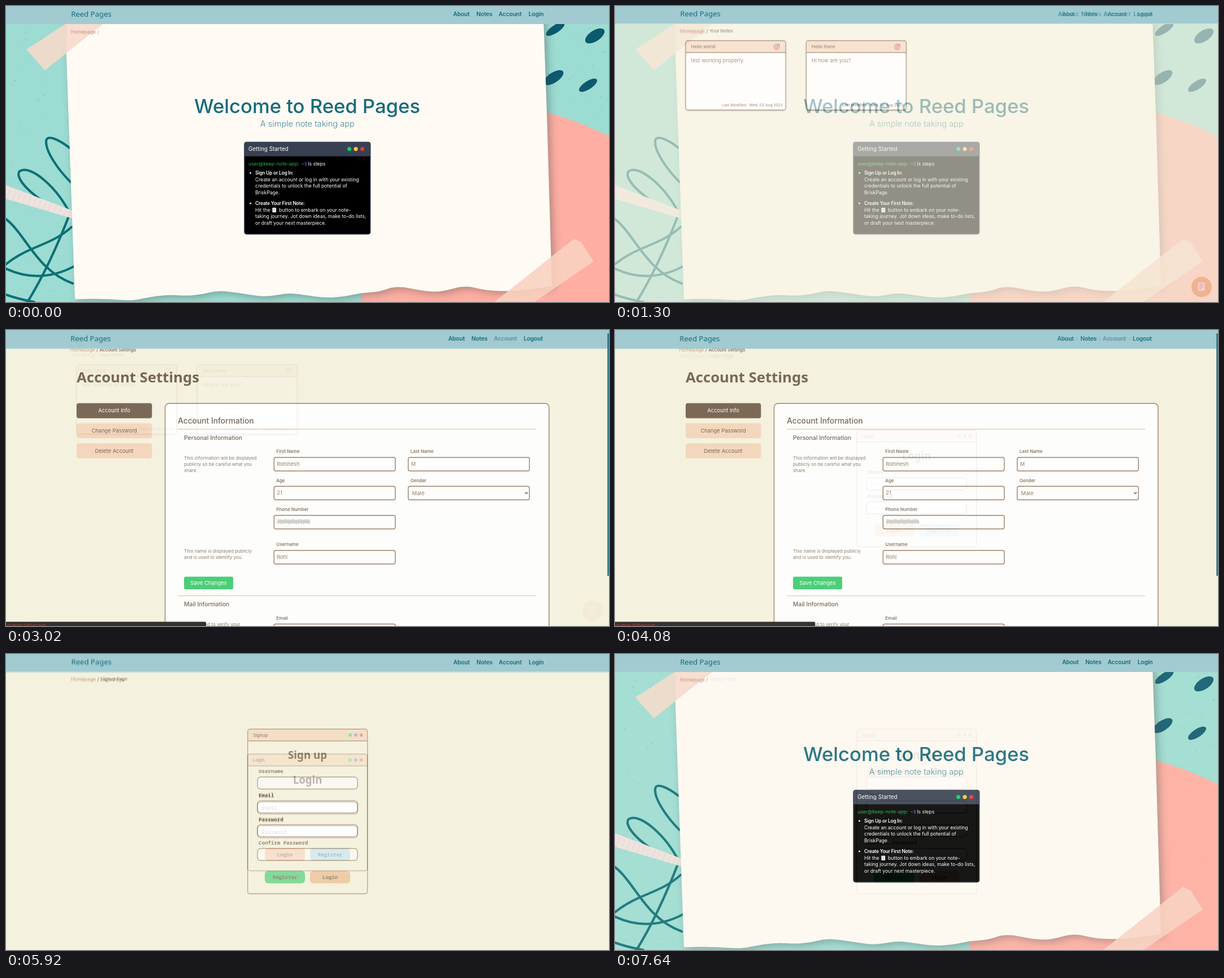
Recreate the animation shown at these times as an HTML page with a canvas. Size 1067x525 px, loop 7.7 s.

```html
<!DOCTYPE html>
<html lang="en">
<head>
<meta charset="utf-8">
<title>Reed Pages</title>
<style>
html, body { margin: 0; width: 100%; height: 100%; overflow: hidden; background: #f4f1de; }
canvas { display: block; }
</style>
</head>
<body>
<canvas id="stage" width="1067" height="525"></canvas>
<script>
const W = 1067, H = 525;
const SANS = 'Inter, "Open Sans", sans-serif';
const HUMAN = '"Noto Sans", "Open Sans", sans-serif';
const MONO = '"Noto Sans Mono", "DejaVu Sans Mono", monospace';
const CREAM = '#f4f1de', BAR = '#a1cbd1', TEAL = '#186a7e', BROWN = '#6d5947', DARK = '#5c4836';
const EDGE = '#94765c', PEACH = '#f3d4b8', ORANGE = '#ebb483', GREEN = '#38cb6c', TAN = '#bf9c78';

let g;

function text(s, x, y, size, color, o = {}) {
  g.font = `${o.weight || 400} ${size}px ${o.font || SANS}`;
  g.letterSpacing = (o.gap || 0) + 'px';
  g.textAlign = o.align || 'left';
  g.fillStyle = color;
  g.fillText(s, x, y);
}

function box(x, y, w, h, r, fill, stroke, line = 1.3) {
  g.beginPath();
  g.roundRect(x, y, w, h, r);
  if (fill) { g.fillStyle = fill; g.fill(); }
  if (stroke) { g.strokeStyle = stroke; g.lineWidth = line; g.stroke(); }
}

function dot(x, y, r, color) {
  g.beginPath();
  g.arc(x, y, r, 0, 7);
  g.fillStyle = color;
  g.fill();
}

function poly(points, color) {
  g.beginPath();
  points.forEach(p => g.lineTo(...p));
  g.closePath();
  g.fillStyle = color;
  g.fill();
}

function rule(x1, x2, y, color, width = 1.3) {
  g.beginPath();
  g.moveTo(x1, y);
  g.lineTo(x2, y);
  g.strokeStyle = color;
  g.lineWidth = width;
  g.stroke();
}

function shadow(color, blur, dx, dy) {
  g.shadowColor = color;
  g.shadowBlur = blur;
  g.shadowOffsetX = dx;
  g.shadowOffsetY = dy;
}

const noShadow = () => shadow('transparent', 0, 0, 0);

function header(h, y, member, dx = 0, active = '') {
  g.fillStyle = BAR;
  g.fillRect(0, 0, W, h);
  text('Reed Pages', 115.5 + dx, y + 4, 13.1, TEAL, { font: HUMAN, weight: 500 });
  const shift = (member ? -7.5 : 0) + dx;
  [['About', 791.5], ['Notes', 832.5], ['Account', 872], [member ? 'Logout' : 'Login', 925]].forEach(([s, x]) =>
    text(s, x + shift, y + 3.7, 10.2, s === active ? '#5b93a3' : TEAL, { weight: 600, gap: -.1 }));
}

function crumbs(y, page, dx = 0) {
  text('Homepage', 115 + dx, y, 8.5, TAN);
  text('/', 161.5 + dx, y, 8.5, BROWN);
  text(page, 167 + dx, y, 8.2, BROWN, { weight: 500, gap: -.15 });
}

function sheetIcon(x, y, w, h, fill, ink) {
  box(x, y, w, h, .8, fill);
  for (let i = 1; i < 5; i++) rule(x + w * .2, x + w * (i === 4 ? .55 : .8), y + h * i / 5.2, ink, h / 18);
}

/* ---- home ---- */

function scenery() {
  g.fillStyle = '#9ddcd2';
  g.fillRect(0, 0, W, H);

  g.fillStyle = '#feaea2';
  g.fill(new Path2D('M628 525V500L940 184Q1010 202 1067 231V525Z'));

  let seed = 11;
  const rnd = () => (seed = seed * 16807 % 2147483647) / 2147483647;
  for (let i = 0; i < 190; i++) {
    const x = rnd() < .5 ? rnd() * 122 : 950 + rnd() * 117, y = 32 + rnd() * 493;
    const pink = x > 900 && y > 215;
    g.fillStyle = pink ? 'rgba(235,130,120,.25)' : `rgba(40,120,125,${.15 + rnd() * .4})`;
    g.fillRect(x, y, .6 + rnd() * 1.2, .6 + rnd());
  }

  [[972, 41, 19, 7], [1042, 53, 19.5, 9.5], [969, 127, 20, 9], [1030, 140.5, 18.5, 7.3]].forEach(([x, y, a, b]) => {
    g.beginPath();
    g.ellipse(x, y, a, b, -.58, 0, 7);
    g.fillStyle = '#0b5a6e';
    g.fill();
  });

  g.strokeStyle = '#0d7076';
  g.lineWidth = 4.2;
  g.lineCap = 'round';
  ['M113 252C95 238 72 226 71 240C70 258 92 290 114 312',
   'M113 368C92 325 45 280 24 293C12 308 62 352 113 372',
   'M113 368C95 415 72 470 38 525',
   'M0 378C35 405 55 470 118 492',
   'M116 392C80 425 40 425 0 458',
   'M0 466C30 480 70 488 120 462',
   'M0 512C22 520 35 522 50 525'].forEach(d => g.stroke(new Path2D(d)));
  g.lineCap = 'butt';

  poly([[0, 318], [118, 363], [118, 377], [0, 342]], '#eee3df');
  for (let x = 6; x < 112; x += 9)
    poly([[x, 322 + x * .37], [x + 4, 324 + x * .37], [x - 2, 340 + x * .31], [x - 5, 339 + x * .31]], 'rgba(220,200,198,.2)');
}

function paper() {
  const torn = [[966, 497], [935, 501], [900, 506], [850, 505], [812, 495], [772, 507], [740, 506],
    [692, 496], [660, 507], [628, 509], [600, 515], [565, 518], [525, 512], [500, 509], [460, 516],
    [430, 512], [400, 507], [372, 505], [345, 512], [318, 514], [285, 512], [250, 517], [222, 523], [175, 519], [122, 520]];
  g.beginPath();
  g.moveTo(107, 20);
  g.lineTo(951, 20);
  g.lineTo(957, 190);
  g.lineTo(...torn[0]);
  for (let i = 1; i < torn.length - 1; i++) {
    const [a, b] = [torn[i], torn[i + 1]];
    g.quadraticCurveTo(...a, (a[0] + b[0]) / 2, (a[1] + b[1]) / 2);
  }
  g.lineTo(122, 520);
  g.lineTo(107, 90);
  g.closePath();
  shadow('rgba(60,70,70,.38)', 14, 5, 4);
  g.fillStyle = '#fffaf4';
  g.fill();
  noShadow();
  poly([[36, 77], [105, 32], [172, 32], [140, 57], [69, 114]], 'rgba(248,218,203,.88)');
  poly([[1005, 413], [1018, 419], [1040, 453], [935, 525], [864, 525]], 'rgba(250,210,193,.88)');
}

function terminal() {
  box(421.8, 241.3, 223, 163.5, 4, '#000', '#3d4a5c');
  box(422.2, 241.7, 222.2, 24.8, [4, 4, 0, 0], '#384152');
  text('Getting Started', 429, 257, 9.9, '#fff');
  ['#02d06a', '#facc33', '#ee3434'].forEach((c, i) => dot(607.5 + i * 11.5, 253.6, 3.6, c));

  text('user@keep-note-app:', 429, 283, 8.6, '#1fb544');
  text('~$', 522.5, 283, 8, '#4a66d8');
  text('ls steps', 534.5, 283, 8.5, '#fff');

  const head = { weight: 600, gap: -.2 };
  const line = (s, y, x = 441) => text(s, x, y, 8.6, '#fff');
  dot(432.5, 296, 1.5, '#fff');
  text('Sign Up or Log In:', 441, 299, 8.4, '#fff', head);
  line('Create an account or log in with your existing', 310.7);
  line('credentials to unlock the full potential of', 322.4);
  line('BriskPage.', 334);
  dot(432.5, 350, 1.5, '#fff');
  text('Create Your First Note:', 441, 353, 8.4, '#fff', head);
  line('Hit the', 364.6);
  sheetIcon(471.3, 357.8, 6.8, 8.2, '#f2f2f2', '#999');
  line('button to embark on your note-', 364.6, 483);
  line('taking journey. Jot down ideas, make to-do lists,', 376.3);
  line('or draft your next masterpiece.', 388);
}

function home() {
  scenery();
  paper();
  header(32, 14.5, false, -.3);
  text('Homepage /', 115, 49, 8.5, '#c39780');
  text('Welcome to Reed Pages', 533, 190, 34.6, '#176b7b', { weight: 500, align: 'center' });
  text('A simple note taking app', 533.3, 213.8, 14.6, '#42879a', { weight: 300, align: 'center' });
  terminal();
}

/* ---- notes ---- */

function note(x, title, body) {
  shadow('rgba(70,50,30,.35)', 3, 0, 1.5);
  box(x, 61.5, 177, 123, 4, '#fff');
  noShadow();
  box(x, 61.5, 177, 21, [4, 4, 0, 0], PEACH);
  box(x, 61.5, 177, 123, 4, null, '#80624a');
  rule(x, x + 177, 82.5, '#80624a');
  text(title, x + 9.5, 75, 8, DARK, { weight: 500 });
  text(body, x + 9.5, 100.3, 9.2, BROWN);
  text('Last Modified : Wed, 02 Aug 2023', x + 172, 177.6, 6.7, DARK, { align: 'right' });

  const cx = x + 161, cy = 72.5;
  [[5.4, '#d9403c'], [4.1, '#fff'], [2.9, '#d9403c'], [1.7, '#fff'], [.8, '#d9403c']].forEach(([r, c]) => dot(cx, cy, r, c));
  poly([[cx, cy + .4], [cx + 3, cy - 4], [cx + 4, cy - 3]], '#4a6d8c');
  poly([[cx + 2, cy - 3], [cx + 3.2, cy - 6.2], [cx + 5.6, cy - 5], [cx + 5, cy - 2.5]], '#46a5d8');
}

function notes() {
  g.fillStyle = CREAM;
  g.fillRect(0, 0, W, H);
  header(31, 14, true);
  crumbs(47, 'Your Notes');
  note(125, 'Hello world', 'test working properly.');
  note(338.3, 'Hello there', 'Hi how are you?');
  dot(1038, 498.3, 18, ORANGE);
  sheetIcon(1031.5, 490.5, 12, 14.5, '#eee6f1', '#9a8fa8');
}

/* ---- account ---- */

function field(x, y, label, value) {
  text(label, x + 4, y - 7.6, 8, BROWN, { weight: 500 });
  box(x, y, 214.5, 24, 3, '#fff', EDGE, 1.4);
  text(value, x + 5, y + 15.2, 9.2, '#867664');
}

function account() {
  g.fillStyle = CREAM;
  g.fillRect(0, 0, W, H);
  crumbs(38, 'Account Settings', -1.5);
  header(33.3, 15.5, true, -1.5, 'Account');
  text('Account Settings', 125, 93, 25.7, BROWN, { font: HUMAN, weight: 700 });

  ['Account Info', 'Change Password', 'Delete Account'].forEach((s, i) => {
    const y = 129.8 + i * 35.7;
    box(125, y, 133.3, 26.6, 4, i ? PEACH : BROWN);
    text(s, 191.6, y + 16.4, 9.4, i ? BROWN : '#fff', { align: 'center' });
  });

  box(281.5, 130.3, 679.5, 420, 7, '#fff', EDGE, 1.4);
  const cap = { weight: 500 };
  text('Account Information', 304, 166.3, 13.8, BROWN, cap);
  rule(304, 938, 176, '#ecc9a4');
  text('Personal Information', 315, 194.5, 10.4, BROWN, cap);
  const hint = (s, y) => text(s, 315, y, 8.16, '#857461');
  hint('This information will be displayed', 229.8);
  hint('publicly so be careful what you', 241);
  hint('share.', 252.2);
  field(474.3, 226, 'First Name', 'Rohinesh');
  field(711.7, 226, 'Last Name', 'M');
  field(474.3, 277.2, 'Age', '21');
  field(711.7, 277.2, 'Gender', '');
  text('Male', 718.5, 292.6, 9.6, '#867664');
  g.beginPath();
  g.moveTo(918.3, 287.8);
  g.lineTo(920.8, 290.3);
  g.lineTo(923.3, 287.8);
  g.strokeStyle = '#555';
  g.stroke();

  field(474.3, 328.8, 'Phone Number', '');
  g.beginPath();
  for (let i = 0; i <= 48; i++) g.lineTo(480 + i * 1.2, 339.8 + 3.6 * Math.sin(i * 2.3));
  g.strokeStyle = '#cccbc9';
  g.lineWidth = 2.4;
  g.lineJoin = 'round';
  g.stroke();
  g.lineJoin = 'miter';

  hint('This name is displayed publicly', 395);
  hint('and is used to identify you.', 406.2);
  field(474.3, 391, 'Username', 'Rohi');
  box(315, 437.5, 87, 22.6, 3, GREEN);
  text('Save Changes', 358.5, 452.2, 9.5, '#fff', { align: 'center' });
  rule(304, 938, 471.3, '#ecc9a4');
  text('Mail Information', 315, 490, 10.4, BROWN, cap);
  hint('This is used to verify your', 525);
  field(474.3, 521.5, 'Email', '');

  box(-4, 517.5, 358, 12, [0, 2, 0, 0], '#211d1c');
  text('localhost:3000/account', 2, 525.8, 6.1, '#e02020');
  g.fillStyle = '#2a7488';
  g.fillRect(1064, 6, 3, 430);
}

/* ---- sign-in forms ---- */

function form(y, h, name, title, fields, buttons) {
  box(427.6, y, 212, 21, [4, 4, 0, 0], PEACH);
  box(427.6, y, 212, h, 4, null, EDGE, 1.4);
  rule(427.6, 639.6, y + 21, EDGE, 1.4);
  text(name, 437, y + 13.4, 7.9, DARK, { weight: 500 });
  ['#4fd87c', '#5aa3f2', '#f2696c'].forEach((c, i) => dot(609 + i * 9.8, y + 10.5, 2.9, c));
  text(title, 533.6, y + 52.8, 18.7, DARK, { font: HUMAN, weight: 700, align: 'center' });

  const mono = { font: MONO, weight: 700 };
  fields.forEach(([label, hint], i) => {
    const fy = y + 85 + i * 42.25;
    text(label, 447, fy - 7.2, 9.1, DARK, mono);
    box(445, fy, 177, 21.3, 5.5, '#fff', EDGE, 1.4);
    text(hint, 452.5, fy + 13.8, 9.1, '#a0a6b0', { font: MONO, weight: 500 });
  });
  buttons.forEach(([s, fill, ink], i) => {
    const x = 458 + i * 80, by = y + 82.5 + fields.length * 42.25;
    box(x, by, 71, 22, 5.5, fill);
    text(s, x + 35.5, by + 14.3, 9.1, ink, { ...mono, align: 'center' });
  });
}

function login() {
  g.fillStyle = CREAM;
  g.fillRect(0, 0, W, H);
  header(33.5, 15.5, false);
  crumbs(49, 'Login Page');
  form(177.5, 207, 'Login', 'Login', [['Email', 'Email'], ['Password', 'Password']],
    [['Login', ORANGE, DARK], ['Register', BAR, TEAL]]);
}

function signup() {
  g.fillStyle = CREAM;
  g.fillRect(0, 0, W, H);
  header(31.3, 14, false);
  crumbs(47, 'Signup Page');
  form(133.2, 292, 'Signup', 'Sign up', [['Username', ''], ['Email', ''], ['Password', ''], ['Confirm Password', '']],
    [['Register', GREEN, DARK], ['Login', ORANGE, DARK]]);
}

/* ---- playback ---- */

const pages = [home, notes, account, login, signup].map(draw => {
  const c = document.createElement('canvas');
  c.width = W;
  c.height = H;
  g = c.getContext('2d');
  draw();
  return c;
});

const HOLD = 1000, STEP = 60, SPAN = 1540;
const stage = document.getElementById('stage').getContext('2d');
const start = performance.now();

function frame() {
  const t = (performance.now() - start) % (SPAN * pages.length);
  const i = Math.floor(t / SPAN), r = t - i * SPAN;
  const mix = r < HOLD ? 0 : (Math.floor((r - HOLD) / STEP) + 1) / 10;
  stage.globalAlpha = 1;
  stage.drawImage(pages[i], 0, 0);
  if (mix) {
    stage.globalAlpha = mix;
    stage.drawImage(pages[(i + 1) % pages.length], 0, 0);
  }
  requestAnimationFrame(frame);
}
frame();
</script>
</body>
</html>
```
